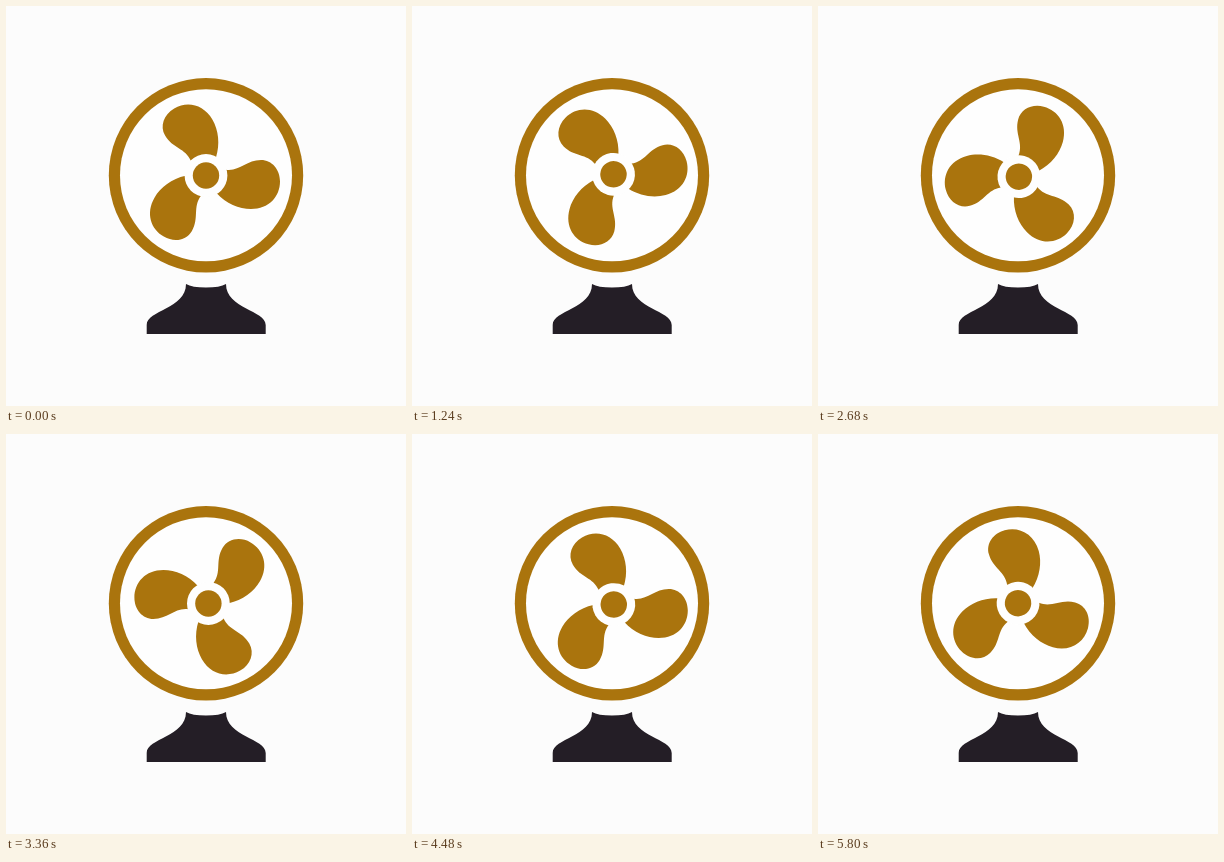
An HTML page with a canvas for the animation above (5840 ms loop, 400x400 px).

```html
<!DOCTYPE html>
<html lang="en">
<head>
<meta charset="utf-8">
<title>Desk fan</title>
<style>
  html, body { margin: 0; width: 100%; height: 100%; overflow: hidden; background: #fcfcfc; }
  canvas { display: block; width: 400px; height: 400px; }
</style>
</head>
<body>
<canvas id="stage"></canvas>
<script>
const LOOP = 5840, TICK = 40, STEP = Math.PI / 12;
const GOLD = '#aa740d', DARK = '#241e26', PAPER = '#fcfcfc', WHITE = '#fefefe';

const canvas = document.getElementById('stage');
const ctx = canvas.getContext('2d');
const scale = window.devicePixelRatio || 1;
canvas.width = canvas.height = 400 * scale;

const blade = new Path2D(
  'M10 -4 L20 -5.8 C34 -4 40 -15.5 55 -15.5 C66 -15.5 74 -6 74 6 ' +
  'C74 21 63 33.5 45 33.5 C33 33.5 20 28 10.5 17.5 Z');
const base = new Path2D(
  'M180 278 C180 303 140.7 304 140.7 319 V328 H259.7 V319 ' +
  'C259.7 304 220 303 220 278 Q214 281.6 200 281.6 Q186 281.6 180 278 Z');

function disc(x, y, r, color) {
  ctx.fillStyle = color;
  ctx.beginPath();
  ctx.arc(x, y, r, 0, 2 * Math.PI);
  ctx.fill();
}

function drawRotor(angle) {
  ctx.save();
  // The axle sits slightly off the hub, so the hub wobbles.
  ctx.translate(201.2, 169.5);
  ctx.rotate(angle);
  ctx.translate(-1.2, 0);
  ctx.fillStyle = GOLD;
  for (let i = 0; i < 3; i++) {
    ctx.fill(blade);
    ctx.rotate(2 * Math.PI / 3);
  }
  disc(0, 0, 21.4, WHITE);
  disc(0, 0, 13.2, GOLD);
  ctx.restore();
}

function draw(time) {
  const tick = Math.floor((time % LOOP) / TICK);
  ctx.setTransform(scale, 0, 0, scale, 0, 0);
  ctx.fillStyle = PAPER;
  ctx.fillRect(0, 0, 400, 400);
  ctx.fillStyle = DARK;
  ctx.fill(base);
  disc(200, 169.3, 97.2, GOLD);
  disc(200, 169.3, 86, WHITE);
  drawRotor(tick * STEP);
}

const start = performance.now();
function loop() {
  draw(performance.now() - start);
  requestAnimationFrame(loop);
}
loop();
</script>
</body>
</html>
```
